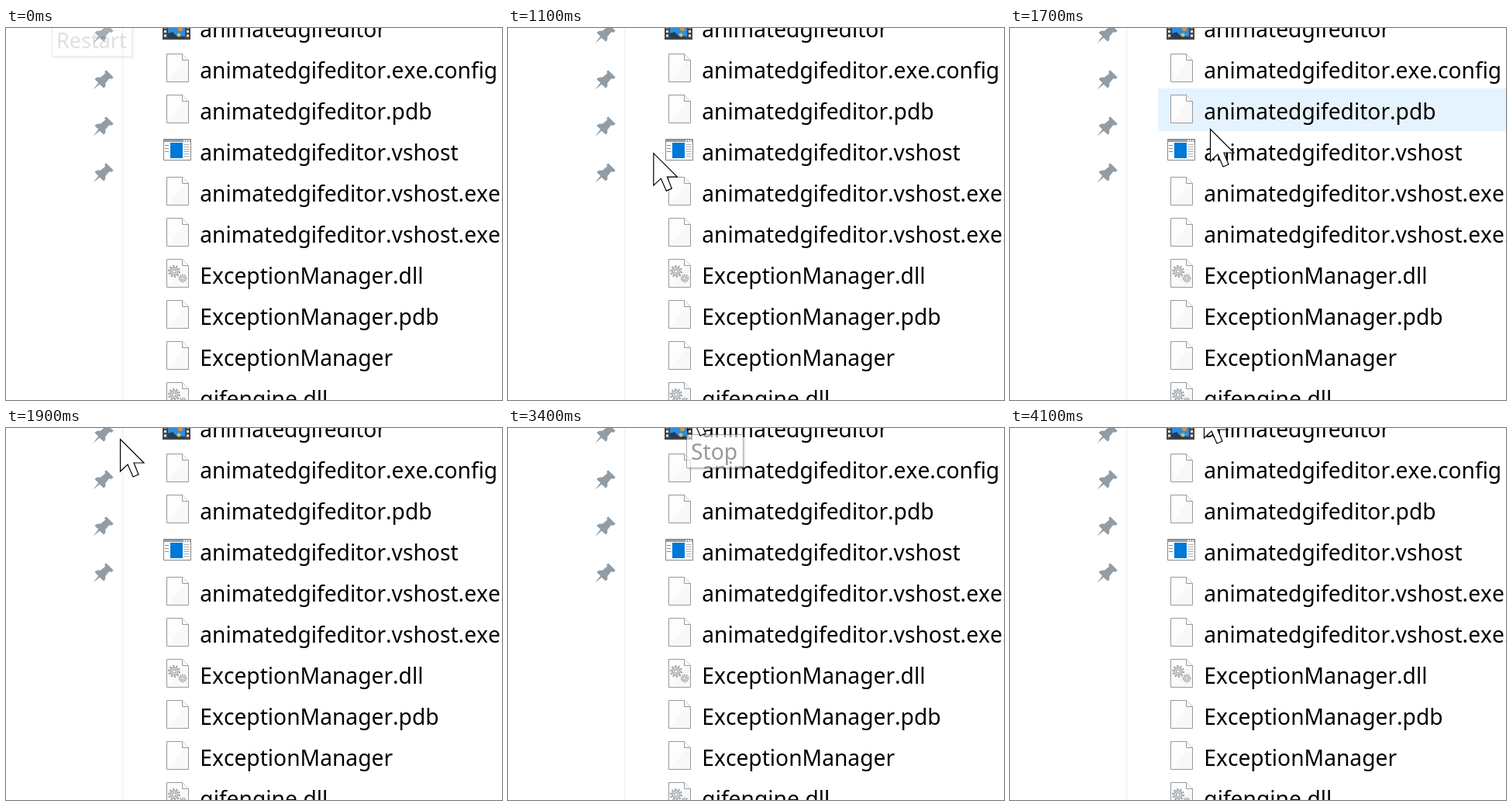
Recreate the animation shown at these times as an HTML page. Size 640 by 480 pixels, loop 4.3 s.

```html
<!DOCTYPE html>
<html lang="en">
<head>
<meta charset="utf-8">
<title>File list</title>
<style>
  html, body { margin: 0; width: 100%; height: 100%; overflow: hidden; background: #fff; }
  svg { display: block; width: 640px; height: 480px; }
  text { font-family: "Noto Sans", "Open Sans", sans-serif; font-size: 28.2px; font-kerning: none; }
  .hover { fill: #e5f3ff; }
  .tip rect { fill: #fff; stroke: #767676; }
  .tip .shade { fill: #000; stroke: none; opacity: .2; }
  .tip text { fill: #575757; }
</style>
</head>
<body>
<svg viewBox="0 0 640 480">
  <defs>
    <linearGradient id="paper" x1="0" y1="0" x2="1" y2="1">
      <stop offset=".5" stop-color="#fdfdfd"/>
      <stop offset=".55" stop-color="#f8f8f8"/>
    </linearGradient>
    <g id="doc">
      <path d="M.5 .5H20.5L28.5 8.5V36.5H.5Z" fill="url(#paper)" stroke="#999"/>
      <path d="M20.5 .5V8.5H28.5" fill="#fff" stroke="#999"/>
    </g>
    <g id="gear" fill="none" stroke="#9ba2a7">
      <circle r="7" stroke-width="2" stroke-dasharray="2.4 2"/>
      <circle r="5" fill="#e6e9eb" stroke-width="1.4"/>
      <circle r="2.3" fill="#fff" stroke-width="1.2"/>
    </g>
    <g id="dll">
      <use href="#doc"/>
      <use href="#gear" x="10" y="16"/>
      <use href="#gear" transform="translate(21 25) scale(.68)"/>
    </g>
    <g id="app" transform="translate(-4 4)">
      <path d="M.5 .5H35.5V27.5H.5Z" fill="#fff" stroke="#858585"/>
      <path d="M1 1H35V4H1Z" fill="#9a9a9a"/>
      <path d="M26 2.5H34" stroke="#fff" stroke-width="2" stroke-dasharray="2 1"/>
      <path d="M9 5H25V25H9Z" fill="#0078d7"/>
      <path d="M4.5 8V18" stroke="#888" stroke-width="5" stroke-dasharray="1 3"/>
      <path d="M30 7V24" stroke="#aaa" stroke-width="7" stroke-dasharray="1 2"/>
    </g>
    <g id="film" transform="translate(-5 0)">
      <path d="M0 0H36V35H0Z" fill="#454545"/>
      <path d="M3.5 1V34M32.5 1V34" stroke="#e8e8e8" stroke-width="3" stroke-dasharray="3 2.5"/>
      <path d="M7 0H29V33H7Z" fill="#2b8fdc"/>
      <path d="M7 27L13 25L18 30L29 31V33H7Z" fill="#1f3f5c"/>
      <circle cx="23" cy="21" r="3" fill="#e8913a"/>
      <circle cx="21" cy="29" r="2.5" fill="#e9b64a"/>
    </g>
    <path id="pin" fill="#929ca4" transform="scale(1.06)"
      d="M4 -12L13 -3L10 -1L8 -2L3 4Q4 8 1 10L-4 5.500L-12 12L-5.500 3.500L-10 -1Q-7 -4 -3 -3L3 -8L2 -10Z"/>
  </defs>

  <path d="M150.500 0V480" stroke="#f4f4f4" stroke-width="2"/>
  <rect id="navHover" class="hover" width="150" height="60"/>
  <rect id="rowHover" class="hover" x="191" width="449" height="55"/>
  <g id="pins"></g>
  <g id="files"></g>
  <g id="restart" class="tip">
    <rect class="shade" x="62" y="-3" width="104" height="43"/>
    <rect x="59.5" y="-6.5" width="103" height="43"/>
    <text x="65" y="26" style="font-size:27px">Restart</text>
  </g>
  <g id="stop" class="tip">
    <rect class="shade" x="233" y="11" width="73" height="43"/>
    <rect x="230.5" y="8.5" width="73" height="43"/>
    <text x="236" y="41">Stop</text>
  </g>
  <path id="cursor" d="M.5 .5V42L10 33L17 49L24 46L18 31H31Z" fill="#fff" stroke="#000" stroke-width="1.2"/>
</svg>
<script>
const LOOP = 4300, STEP = 100, ROW = 53, NAV = 60;
const $ = id => document.getElementById(id);

const app = "animatedgifeditor", lib = "ExceptionManager";
const files = [
  ["film", app], ["doc", app + ".exe.config"], ["doc", app + ".pdb"],
  ["app", app + ".vshost"], ["doc", app + ".vshost.exe.config"], ["doc", app + ".vshost.exe.manifest"],
  ["dll", lib + ".dll"], ["doc", lib + ".pdb"], ["doc", lib], ["dll", "gifengine.dll"]
];
$("files").innerHTML = files.map(([icon, name], i) =>
  `<use href="#${icon}" x="207" y="${i * ROW - 20}"/>` +
  `<text x="250.3" y="${i * ROW + 12}">${name}</text>`).join("");
for (let i = 0; i < 4; i++)
  $("pins").innerHTML += `<use href="#pin" x="125" y="${i * NAV + 7}"/>`;

// pointer strokes: start, end, then the place reached; it rests in between
const home = [85, -50];
const strokes = [
  [200, 600, 134, 22], [600, 1200, 198, 189], [1300, 1400, 210, 230],
  [1400, 1700, 258, 130], [1700, 1900, 147, 14], [1900, 2400, 59, -41],
  [2500, 3000, 224, -41], [3300, 3400, 231, -39], [3400, 3600, 263, 112],
  [3600, 3700, 272, 432], [3700, 3900, 250, -19], [4000, 4100, 250, -29]
];

const clamp = v => Math.min(1, Math.max(0, v));

function pointer(t) {
  let [x, y] = home;
  for (const [from, to, toX, toY] of strokes) {
    const p = clamp((t - from) / (to - from));
    x += (toX - x) * p;
    y += (toY - y) * p;
  }
  return [x, y];
}

function hover(id, on, y, top, size) {
  $(id).setAttribute("visibility", on ? "visible" : "hidden");
  $(id).setAttribute("y", Math.floor((y - top) / size) * size + top);
}

function fade(id, age, alpha, life) {
  $(id).setAttribute("opacity", age < 0 ? 0 : alpha * clamp(1 - age / life));
}

function draw(t) {
  const [x, y] = pointer(t);
  $("cursor").setAttribute("transform", `translate(${x} ${y})`);
  hover("rowHover", x >= 191 && y > 0, y, -28, ROW);
  hover("navHover", x < 150 && y >= 37, y, 37, NAV);
  fade("restart", t, .18, 200);
  fade("stop", t - 3400, .6, 480);
}

const start = performance.now();
function tick() {
  const t = (performance.now() - start) % LOOP;
  draw(Math.floor(t / STEP) * STEP);
  requestAnimationFrame(tick);
}
draw(0);
requestAnimationFrame(tick);
</script>
</body>
</html>
```
